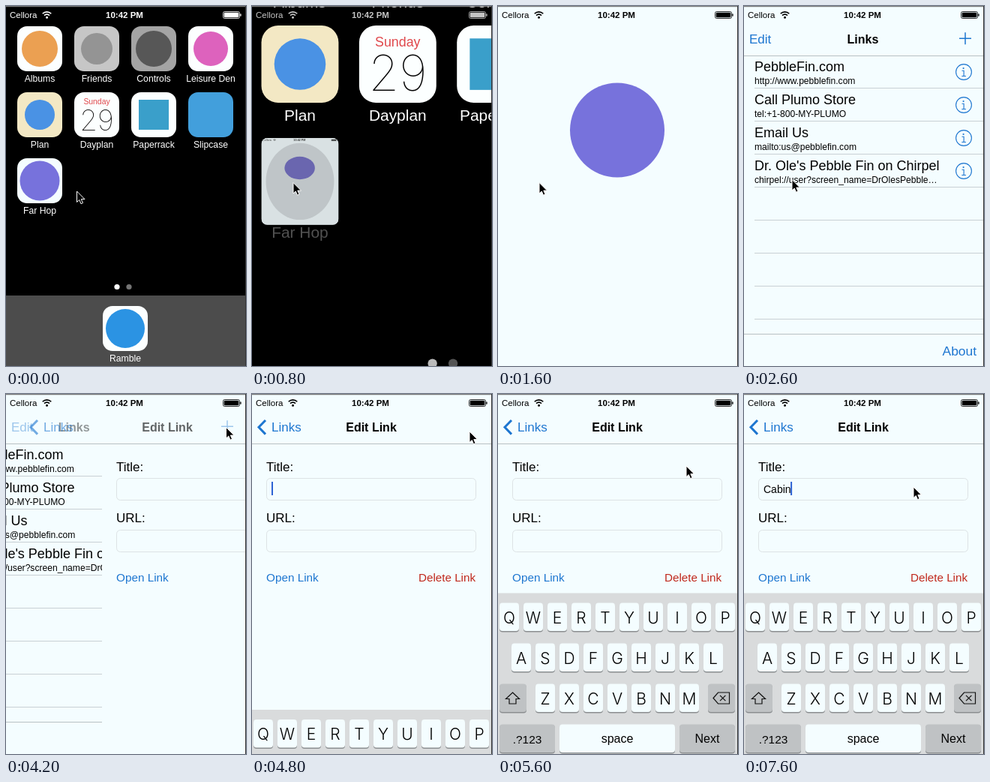
An HTML page for the animation above (8 s loop, 320 px wide and 480 px high).

```html
<!DOCTYPE html>
<html lang="en">
<head>
<meta charset="utf-8">
<title>Link app</title>
<style>
html, body { margin: 0; width: 100%; height: 100%; overflow: hidden; background: #000; }
svg { display: block; width: 100%; height: 100%; }
text { font-family: "Liberation Sans", Arial, sans-serif; white-space: pre; }
.thin { font-family: Inter, "Liberation Sans", sans-serif; font-weight: 300; }
.hairline { font-family: Inter, "Liberation Sans", sans-serif; font-weight: 100; }
</style>
</head>
<body>
<svg id="stage" viewBox="0 0 320 480"></svg>
<script>
const DURATION = 8000, TICK = 200;
const PAPER = '#f4fdff', BLUE = '#1d76d0', RED = '#c0281c', LINE = '#c9d0d3', MARK = '#7772dc';

const text = (x, y, size, str, attrs = '') => `<text x="${x}" y="${y}" font-size="${size}" ${attrs}>${str}</text>`;
const mid = (x, y, size, str, attrs = '') => text(x, y, size, str, `text-anchor="middle" ${attrs}`);
const end = (x, y, size, str, attrs = '') => text(x, y, size, str, `text-anchor="end" ${attrs}`);
const box = (x, y, w, h, fill, rx = 0, attrs = '') =>
  `<rect x="${x}" y="${y}" width="${w}" height="${h}" rx="${rx}" fill="${fill}" ${attrs}/>`;
const dot = (x, y, r, fill, attrs = '') => `<circle cx="${x}" cy="${y}" r="${r}" fill="${fill}" ${attrs}/>`;
const path = (d, attrs) => `<path d="${d}" ${attrs}/>`;
const group = (id, body, attrs = '') => `<g id="${id}" ${attrs}>${body}</g>`;
const stroke = (color, width) => `fill="none" stroke="${color}" stroke-width="${width}"`;

function statusBar(color) {
  const arc = r => path(`M${54.5 - r * .72} ${16 - r * .72}a${r} ${r} 0 0 1 ${r * 1.44} 0`, stroke(color, 1.7));
  return `<g fill="${color}">` + text(5, 16, 11.5, 'Cellora') + arc(8) + arc(4.8) +
    dot(54.5, 15.2, 1.5, color) + mid(158, 16, 11.5, '10:42 PM', 'font-weight="bold"') +
    box(289.5, 7.5, 22, 9, 'none', 2, `stroke="${color}" stroke-width=".8"`) +
    box(290.7, 8.7, 19.6, 6.6, color, 1) + box(312.3, 10.3, 1.3, 3.4, color, .6) + '</g>';
}

/* Home screen */
const label = (x, y, name) => mid(x, y, 12.2, name, 'fill="#fff"');
const tile = (x, y, fill, mark = '') =>
  `<g transform="translate(${x} ${y})">${box(0, 0, 60, 60, fill, 13)}${mark}</g>`;

const dateMark = mid(30, 16, 10.4, 'Sunday', 'fill="#e0484c"') +
  mid(30, 50.5, 38.5, '29', 'class="hairline"');
const apps = [
  ['Albums', '#fcffff', dot(30, 30, 24, '#eba052')],
  ['Friends', '#c6c6c6', dot(30, 30, 21, '#949494')],
  ['Controls', '#a4a4a4', dot(30, 30, 24, '#575757')],
  ['Leisure Den', '#fcffff', dot(30, 30, 23, '#dd62bd')],
  ['Plan', '#f3e8c4', dot(30, 30, 20, '#4a92e4')],
  ['Dayplan', '#fcffff', dateMark],
  ['Paperrack', '#fcffff', box(10, 10, 40, 40, '#3a9fca')],
  ['Slipcase', '#429fdc'],
];
const upper = apps.map(([name, fill, mark], i) => {
  const x = 15 + i % 4 * 76, y = 27 + (i >> 2) * 88;
  return tile(x, y, fill, mark) + label(x + 30, y + 74, name);
}).join('');
const lower = group('appLabel', label(45, 277, 'Far Hop')) +
  group('pageDots', dot(148, 374.5, 3.6, '#fff') + dot(164, 374.5, 3.6, '#747474')) +
  box(0, 386, 320, 94, '#4c4c4c') + tile(129, 400, '#fcffff', dot(30, 30, 26, '#2b93e3')) +
  label(159, 474, 'Ramble');

const appWindow = `<clipPath id="clip"><rect id="clipRect" width="320" height="480"/></clipPath>` +
  group('appWindow', box(0, 0, 320, 480, PAPER) +
    group('appIcon', dot(30, 30, 26.5, MARK), 'transform="scale(5.3333 8)"') +
    group('launch', box(0, 0, 320, 480, PAPER) + dot(159, 165.5, 63, MARK) + statusBar('#000')) +
    group('press', box(0, 0, 320, 480, '#000')), 'clip-path="url(#clip)"');

/* App pages */
const links = [
  ['PebbleFin.com', 'http://www.pebblefin.com'],
  ['Call Plumo Store', 'tel:+1-800-MY-PLUMO'],
  ['Email Us', 'mailto:us@pebblefin.com'],
  ["Dr. Ole's Pebble Fin on Chirpel", 'chirpel://user?screen_name=DrOlesPebble…'],
];
const info = y => dot(293, y, 10.4, 'none', `stroke="${BLUE}" stroke-width="1.1"`) +
  dot(292.6, y - 5, 1.1, BLUE) + path(`M290.5 ${y - 1.8}h2.6v7.3m-2.8 0h5.6`, stroke(BLUE, 1.1));
const row = ([title, url], i) =>
  text(14, 87 + 44 * i, 18, title) + text(14, 103.5 + 44 * i, 12.1, url) + info(88 + 44 * i);
const rules = Array.from({ length: 8 }, (_, i) => box(14, 109 + 44 * i, 306, 1, LINE)).join('');
const listPage = box(0, 0, 320, 480, PAPER) + links.map(row).join('') + rules +
  box(0, 437, 320, 1, '#b9c0c3') + end(310, 466, 17.4, 'About', `fill="${BLUE}"`);

const field = y => box(19.5, y + .5, 279, 29, PAPER, 5, 'stroke="#dde3e5"');
const editPage = box(0, 0, 320, 480, PAPER) + text(19, 103, 17, 'Title:') + field(112) +
  text(19, 171, 17, 'URL:') + field(181) +
  text(19, 249.5, 15.3, 'Open Link', `fill="${BLUE}"`) +
  end(298, 249.5, 15.2, 'Delete Link', `fill="${RED}"`) +
  text(26, 132, 14, '', 'id="typed"') + box(26, 117, 2, 18, '#2d62d4', 0, 'id="caret"');

const navBar = box(0, 0, 320, 66, PAPER) + box(0, 66, 320, 1, '#b9c0c3') + statusBar('#000') +
  group('listButtons', text(7, 50, 17, 'Edit', `fill="${BLUE}"`) +
    path('M287 43.3h16m-8-8v16', stroke(BLUE, 1.5))) +
  group('listTitle', mid(158.5, 50, 16, 'Links', 'font-weight="bold"')) +
  group('backButton', path('M18 35l-9 9.3 9 9.3', stroke(BLUE, 3)) + text(26, 50, 17, 'Links', `fill="${BLUE}"`)) +
  group('editTitle', mid(159, 50, 16, 'Edit Link', 'font-weight="bold"'));

/* Keyboard, drawn with its top edge at zero */
const key = (x, y, w, fill = PAPER) => box(x, y + 1, w, 38, '#8b8e90', 4) + box(x, y, w, 37.6, fill, 4);
const DARK_KEY = '#bfc2c4';
const letters = (str, x, y) => [...str].map((c, i) =>
  key(x + 32 * i, y, 26) + mid(x + 13 + 32 * i, y + 27, 21, c, 'class="thin"')).join('');
const keyboard = box(0, 0, 320, 216, '#d9dbdc') +
  letters('QWERTYUIOP', 2, 13) + letters('ASDFGHJKL', 18, 67) + letters('ZXCVBNM', 50, 121) +
  key(2, 121, 36, DARK_KEY) + key(280, 121, 36, DARK_KEY) +
  path('M19.5 132.5l9 8.5h-4.5v6.5h-9v-6.5h-4.5z', stroke('#111', 1.2)) +
  path('M287 140l6.5-7.5h15v15h-15zm9-3.7l7.4 7.4m0-7.4l-7.4 7.4', stroke('#111', 1.2)) +
  key(2, 175, 74, DARK_KEY) + key(82, 175, 154) + key(242, 175, 74, DARK_KEY) +
  mid(39, 200, 15.4, '.?123') + mid(159, 199, 16, 'space') + mid(279, 199, 16, 'Next');

document.getElementById('stage').innerHTML =
  box(0, 0, 320, 480, '#000') + group('upper', upper) + group('lower', lower) +
  group('homeStatus', statusBar('#fff')) + appWindow +
  group('app', group('listPage', listPage) + group('editPage', editPage) + navBar + group('keyboard', keyboard)) +
  box(0, 0, 320, 1.2, '#7a7a7a') + box(319, 0, 1, 480, '#333') +
  group('pointer', path('M0 0V14.5l3.3-3 2.2 5.2 2.5-1.1-2.2-5h4.7z',
    'fill="#000" stroke="#fff" stroke-width="1" stroke-linejoin="round"'));

/* Motion: each row is a time followed by its values */
const pointerPath = [[0, 94.5, 247], [200, 86, 245], [400, 63, 238], [600, 55, 235.5], [1800, 55, 235.5],
  [2600, 64, 231.5], [2800, 90, 205], [3200, 225, 95], [3600, 292, 46], [4400, 294, 44],
  [4800, 290, 50], [5200, 276, 66], [5600, 251, 96], [6000, 226, 124]];
const zoom = [[600, 0, 0], [800, .165, .133], [1000, .75, .73], [1200, .984, .98], [1400, 1, 1]];
const launchFade = [[600, 0], [800, .76], [1000, 1]];
const pressFade = [[200, 0], [400, .3], [600, .4], [800, .11], [1000, 0]];
const listFade = [[2000, 0], [2200, .4], [2400, .9], [2600, 1]];
const push = [[4000, 0], [4200, .6], [4400, .94], [4600, 1]];
const keyboardTop = [[4600, 480], [4800, 421], [5000, 272], [5200, 265.5]];
const typing = [[0, ''], [6400, 'C'], [6600, 'Ca'], [7200, 'Cab'], [7400, 'Cabi'], [7600, 'Cabin']];
const caretShown = [[0, 1], [5400, 0], [5800, 1], [6800, 0], [7200, 1]];

function at(table, t) {
  const next = table.findIndex(r => r[0] > t);
  if (next === 0) return table[0].slice(1);
  if (next < 0) return table.at(-1).slice(1);
  const a = table[next - 1], b = table[next], k = (t - a[0]) / (b[0] - a[0]);
  return a.slice(1).map((v, i) => v + (b[i + 1] - v) * k);
}
const held = (table, t) => table.filter(r => r[0] <= t).at(-1)[1];

const $ = id => document.getElementById(id);
const move = (id, x, y, sx = 1, sy = sx) =>
  $(id).setAttribute('transform', `translate(${x} ${y}) scale(${sx} ${sy})`);
const fade = (id, v) => $(id).setAttribute('opacity', v);

function drawZoom(t) {
  const [p, q] = at(zoom, t);
  const x = 15 * (1 - p), y = 203 * (1 - q), w = 60 + 260 * p, h = 60 + 420 * q;
  const scale = w / 60, homeX = x - 15 * scale, homeY = y + h / 2 - 233 * scale;
  // The rows above make room for the window growing taller than wide.
  move('upper', homeX, homeY - (h - w) * .42, scale);
  move('lower', homeX, homeY, scale);
  move('appWindow', x, y, w / 320, h / 480);
  const radius = Math.max(0, 13 - 30 * p);
  $('clipRect').setAttribute('rx', radius * 320 / w);
  $('clipRect').setAttribute('ry', radius * 480 / h);
  const [launch] = at(launchFade, t);
  fade('launch', launch);
  fade('press', at(pressFade, t)[0]);
  fade('appLabel', 1 - launch * .9);
  fade('pageDots', 1 - launch * .35);
  fade('homeStatus', 1 - launch * .3);
  $('appIcon').style.filter = `grayscale(${Math.min(1, launch * 1.3)})`;
}

function drawApp(t) {
  fade('app', at(listFade, t)[0]);
  const [p] = at(push, t);
  move('listPage', -96 * p, 0);
  move('editPage', 320 * (1 - p), 0);
  move('listTitle', -113 * p, 0);
  move('backButton', 60 * (1 - p), 0);
  move('editTitle', 140 * (1 - p), 0);
  fade('listButtons', 1 - p);
  fade('listTitle', 1 - p);
  fade('backButton', p);
  fade('editTitle', p);
  move('keyboard', 0, at(keyboardTop, t)[0]);
  const word = held(typing, t);
  $('typed').textContent = word;
  $('caret').setAttribute('x', 26 + (word ? $('typed').getComputedTextLength() - .5 : 0));
  fade('caret', t < 4600 ? 0 : held(caretShown, t));
}

let shown = -1;
function frame(now) {
  const t = Math.floor(now % DURATION / TICK) * TICK;
  if (t !== shown) {
    shown = t;
    drawZoom(t);
    drawApp(t);
    move('pointer', ...at(pointerPath, t));
  }
  requestAnimationFrame(frame);
}
frame(0);
</script>
</body>
</html>
```
